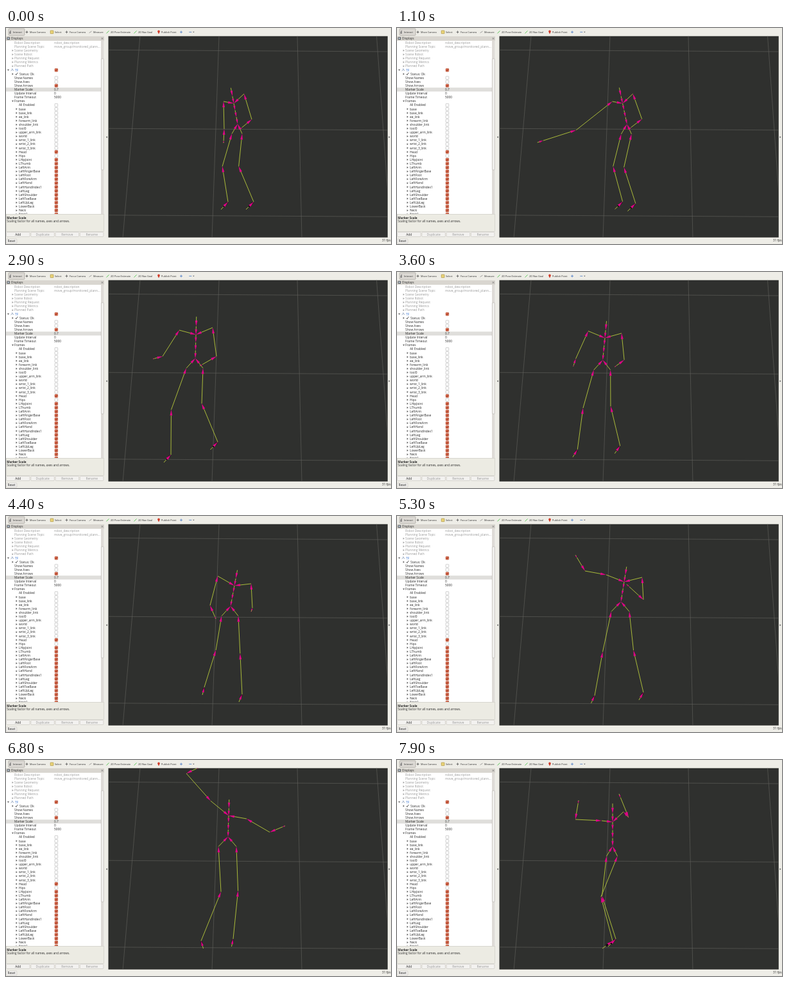
Recreate the animation shown at these times as an HTML page. Size 600 by 338 pixels, loop 8 s.

```html
<!DOCTYPE html>
<html lang="en">
<head>
<meta charset="utf-8">
<title>Skeleton viewer</title>
<style>
html, body { margin: 0; width: 100%; height: 100%; overflow: hidden; background: #edece8; }
svg { display: block; width: 100%; height: 100%; font: 4.8px "Open Sans", "Noto Sans", sans-serif; }
text { fill: #2b2b2b; }
.tool { font-size: 3.85px; }
.dim { fill: #999; }
.grid { fill: none; stroke: #63645f; stroke-width: .6; }
.shafts { fill: none; stroke: #a9b93a; stroke-width: 1; }
.heads { fill: #e00486; }
.feet { fill: none; stroke: #16060c; stroke-width: 2.4; }
</style>
</head>
<body>
<svg viewBox="0 0 600 338">
  <defs>
    <clipPath id="treeClip"><rect y="20" width="148" height="271"/></clipPath>
    <clipPath id="viewClip"><rect x="159.5" y="12.8" width="435.3" height="315"/></clipPath>
  </defs>
  <rect width="600" height="338" fill="#eeede7"/>
  <g id="toolbar"></g>
  <rect y="13" width="153" height="7" fill="#d9d6d0"/>
  <rect x="1.5" y="14.3" width="4.5" height="4" rx=".6" fill="#3c4044"/>
  <rect x="2.2" y="15" width="3.1" height="2.3" fill="#b8c4ce"/>
  <text x="8" y="18.3">Displays</text>
  <path d="M148.5 15l3 3m0-3l-3 3" stroke="#666" stroke-width=".6"/>
  <rect y="20" width="152.5" height="271" fill="#fff"/>
  <g id="tree" clip-path="url(#treeClip)"></g>
  <rect x="148" y="20" width="4.5" height="271" fill="#dedbd7"/>
  <rect x="148.4" y="48" width="3.8" height="174" rx="1" fill="#f2f1ef" stroke="#a8a49e" stroke-width=".5"/>
  <rect x=".3" y="291.3" width="152.3" height="27" fill="#ecebe3" stroke="#c4c1bb" stroke-width=".5"/>
  <text x="1.3" y="298.6" font-weight="700" font-size="4.7">Marker Scale</text>
  <text x="1.3" y="304.2" font-size="4.7">Scaling factor for all names, axes and arrows.</text>
  <g id="buttons"></g>
  <text x="599.5" y="334.4" text-anchor="end">31 fps</text>
  <path d="M157.8 169.2v3l-2-1.5zM596.5 169.2v3l2-1.5z" fill="#555"/>
  <g clip-path="url(#viewClip)">
    <rect x="159" y="12" width="436" height="317" fill="#2f302e"/>
    <path class="grid" d="M159 34.4L595 37M159 157.2L595 159.8M159 292.8L595 295.3
      M209 12L182 329M332 12L321 329M454 12L461 329M577.5 12L600 329"/>
    <path id="shafts" class="shafts"/>
    <path id="feet" class="feet"/>
    <path id="heads" class="heads"/>
  </g>
</svg>
<script>
const byId = id => document.getElementById(id);

function add(parent, tag, attrs, content = "") {
  const node = document.createElementNS("http://www.w3.org/2000/svg", tag);
  for (const name in attrs) node.setAttribute(name, attrs[name]);
  node.textContent = content;
  return parent.appendChild(node);
}

function buildToolbar() {
  const bar = byId("toolbar");
  add(bar, "rect", { x: 4, y: 1, width: 25, height: 10.6, rx: 1.3, fill: "#dcd9d4", stroke: "#98948d", "stroke-width": .6 });
  const tool = (label, x, icon, fill, stroke = "none") => {
    add(bar, "path", { d: icon, transform: `translate(${x - 4.5} 6.4)`, fill, stroke, "stroke-width": .8 });
    add(bar, "text", { x, y: 7.8, class: "tool" }, label);
  };
  const cross = "M-2 0h4M0 -2v4", arrow = "M-2 2l4 -4";
  tool("Interact", 11, "M-1 0l1 -2 1 -1.5v6h-2z", "#777");
  tool("Move Camera", 37, cross, "none", "#4a4a4a");
  tool("Select", 76, "M-2.3 -2.3h4.6v4.6h-4.6z", "#ecd67a", "#b39a42");
  tool("Focus Camera", 99, cross, "none", "#555");
  tool("Measure", 136, "M-2 1.2l4 -2.4", "none", "#888");
  tool("2D Pose Estimate", 163, arrow, "none", "#35c135");
  tool("2D Nav Goal", 206, arrow, "none", "#35c135");
  tool("Publish Point", 242, "M.5 3l-1.7 -3.5a1.8 1.8 0 1 1 3.4 0z", "#d23a28");
  tool("", 277.5, cross, "none", "#4676c4");
  tool("", 291.8, "M-2 0h4", "none", "#4676c4");
  tool("", 296.9, "M-1.2 -.6h2.4l-1.2 1.4z", "#555");
}

function buildTree() {
  const tree = byId("tree");
  const rows = [];
  const row = (names, x, options = {}) =>
    names.split(" ").forEach(name => rows.push({ name: name.replaceAll("~", " "), x, ...options }));
  row("Robot~Description", 13, { dim: true, value: "robot_description" });
  row("Planning~Scene~Topic", 13, { dim: true, value: "move_group/monitored_plann..." });
  row("Scene~Geometry Scene~Robot Planning~Request Planning~Metrics Planned~Path", 13, { dim: true, arrow: "right" });
  row("TF", 14, { arrow: "down", arrowX: 3.5, check: true, color: "#2f6fd0" });
  row("Status:~Ok", 21, { arrow: "right", tick: true });
  row("Show~Names Show~Axes", 13, { check: false });
  row("Show~Arrows", 13, { check: true });
  row("Marker~Scale", 13, { value: "0.7", selected: true });
  row("Update~Interval", 13, { value: "0" });
  row("Frame~Timeout", 13, { value: "5000" });
  row("Frames", 13, { arrow: "down" });
  row("All~Enabled", 20, { check: false });
  row("base base_link ee_link forearm_link shoulder_link tool0 upper_arm_link world wrist_1_link wrist_2_link wrist_3_link",
    20, { arrow: "right", check: false });
  row("Head", 20, { arrow: "right", check: true });
  row("Hips", 20, { arrow: "right", check: false });
  row("LHipJoint LThumb LeftArm LeftFingerBase LeftFoot LeftForeArm LeftHand LeftHandIndex1 LeftLeg LeftShoulder LeftToeBase LeftUpLeg LowerBack Neck Neck1",
    20, { arrow: "right", check: true });

  rows.forEach((r, i) => {
    const y = 23.1 + i * 6.1;
    if (r.selected) add(tree, "rect", { x: 0, y: y - 3, width: 148, height: 6.1, fill: "#dfdedb" });
    const label = add(tree, "text", { x: r.x, y: y + 1.7, class: r.dim ? "dim" : "" }, r.name);
    if (r.color) label.style.fill = r.color;
    if (r.value) add(tree, "text", { x: 75, y: y + 1.7, class: r.dim ? "dim" : "" }, r.value);
    if (r.arrow) {
      const x = r.arrowX || (r.x > 19 && !r.tick ? 16.5 : 10.5);
      const shape = r.arrow === "down" ? "m-1.5 -1h3l-1.5 2.2z" : "m-1 -1.5v3l2.2 -1.5z";
      add(tree, "path", { d: `M${x} ${y}${shape}`, fill: r.dim ? "#999" : "#555" });
    }
    if (r.tick) add(tree, "path", { d: `M14.5 ${y}l1.3 1.7 2.3-3.7`, fill: "none", stroke: "#333", "stroke-width": .8 });
    if (r.color) add(tree, "path", { d: `M7.7 ${y + 1.5}l2-2.3 2.4 1.7m-2.4-1.7v-1.7`, fill: "none", stroke: "#6b83a8", "stroke-width": .7 });
    if ("check" in r) {
      add(tree, "rect", { x: 76, y: y - 2.3, width: 4.7, height: 4.7, rx: .8,
        fill: r.check ? "#e0684a" : "#fff", stroke: r.check ? "#a9543c" : "#aaa", "stroke-width": .55 });
      if (r.check) add(tree, "path", { d: `M77 ${y}l1.1 1.2 1.9-2.8`, fill: "none", stroke: "#702a18", "stroke-width": .75 });
    }
  });
}

function buildButtons() {
  const group = byId("buttons");
  const button = (label, x, y, width, dim) => {
    add(group, "rect", { x, y, width, height: 7, rx: 1, fill: "#f3f2f0", stroke: "#bdb9b3", "stroke-width": .5 });
    add(group, "text", { x: x + width / 2, y: y + 5.2, "text-anchor": "middle", class: dim ? "dim" : "" }, label);
  };
  ["Add", "Duplicate", "Remove", "Rename"].forEach((label, i) => button(label, .5 + i * 38.3, 319.6, 36.5, i > 0));
  button("Reset", .4, 330, 16.4, false);
}

// width: half the shoulder span, tilt: shoulder slope, leg: ankle and knee bend,
// arm: elbow and fingertip, swing: how far a hand reaches out on the way to the next pose.
const poses = [
  { time: 500, neck: [355, 118], pelvis: [361, 150], width: 16, tilt: -6, swing: -115,
    legs: [[346, 272, -12], [386, 272, -14]], arms: [[340, 158, 339, 180], [383, 143, 365, 158]] },
  { time: 1900, neck: [347, 118], pelvis: [355, 151], width: 16, tilt: -6, swing: -80,
    legs: [[359, 271, -16], [353, 278, -16]], arms: [[329, 162, 320, 178], [380, 142, 357, 158]] },
  { time: 2900, neck: [296, 98], pelvis: [295, 135], width: 26, tilt: -2, swing: 0,
    legs: [[257, 286, -12], [330, 266, -13]], arms: [[244, 132, 229, 136], [328, 132, 302, 147]] },
  { time: 4400, neck: [356, 109], pelvis: [350, 141], width: 26, tilt: 6, swing: 0,
    legs: [[309, 268, 4], [368, 279, 0]], arms: [[318, 140, 327, 161], [384, 144, 382, 150]] },
  { time: 5300, neck: [354, 103], pelvis: [349, 134], width: 28, tilt: 2, swing: -32,
    legs: [[308, 281, -1], [384, 276, -4]], arms: [[293, 86, 278, 61], [384, 131, 358, 107]] },
  { time: 6800, neck: [347, 87], pelvis: [346, 120], width: 28, tilt: 14, swing: 90,
    legs: [[304, 283, 17], [354, 280, 5]], arms: [[281, 21, 300, 12], [411, 113, 435, 103]] },
  { time: 7900, neck: [336, 97], pelvis: [336, 135], width: 17, tilt: -7, swing: 0,
    legs: [[341, 280, -14], [336, 283, -22]], arms: [[278, 93, 283, 63], [361, 90, 346, 53]] },
];

function mix(a, b, u) {
  if (Array.isArray(a)) return a.map((value, i) => mix(value, b[i], u));
  if (typeof a === "object") return Object.fromEntries(Object.keys(a).map(key => [key, mix(a[key], b[key], u)]));
  return a + (b - a) * u;
}

function poseAt(time) {
  const next = Math.max(1, poses.findIndex(pose => pose.time >= time));
  const from = poses[next - 1], to = poses[next];
  const u = Math.max(0, (time - from.time) / (to.time - from.time));
  const pose = mix(from, to, u);
  const reach = from.swing * Math.sin(Math.PI * u);
  const arm = pose.arms[reach < 0 ? 0 : 1];
  arm[0] += reach / 2;
  arm[2] += reach;
  return pose;
}

function draw(time) {
  const { neck, pelvis, width, tilt, legs, arms } = poseAt(time);
  let shafts = "", heads = "", feet = "";

  // Arrows run from child to parent, with the cone at the parent.
  function bone(parent, child) {
    const dx = child[0] - parent[0], dy = child[1] - parent[1];
    const length = Math.hypot(dx, dy) || 1;
    const cone = Math.min(9, length * .65), half = Math.min(1.9, .8 + length * .07);
    const ux = dx / length, uy = dy / length;
    const bx = parent[0] + ux * cone, by = parent[1] + uy * cone;
    shafts += `M${child}L${[bx, by]}`;
    heads += `M${parent}L${[bx - uy * half, by + ux * half]}L${[bx + uy * half, by - ux * half]}z`;
  }
  function chain(...points) {
    for (let i = 1; i < points.length; i++) bone(points[i - 1], points[i]);
  }

  const spine = u => mix(pelvis, neck, u);
  chain(pelvis, spine(1 / 3), spine(2 / 3), neck, spine(1.35), spine(1.76));
  [-1, 1].forEach((side, i) => {
    const [ankleX, ankleY, bend] = legs[i];
    const hip = [pelvis[0] - 1 + side * width / 2, pelvis[1] + 15.5];
    const ankle = [ankleX, ankleY];
    const knee = mix(hip, ankle, .48);
    knee[0] += bend;
    // Feet point the way the knees bend.
    const toe = [ankleX - 5 + bend / 2, ankleY + 12];
    chain(pelvis, hip, knee, ankle, toe);
    feet += `M${mix(ankle, toe, .1)}L${mix(ankle, toe, .65)}`;

    const shoulder = [neck[0] + side * width, neck[1] - 9 + side * tilt];
    const elbow = arms[i].slice(0, 2), tip = arms[i].slice(2);
    chain(neck, shoulder, elbow, mix(elbow, tip, .85), tip);
  });
  byId("shafts").setAttribute("d", shafts);
  byId("heads").setAttribute("d", heads);
  byId("feet").setAttribute("d", feet);
}

buildToolbar();
buildTree();
buildButtons();

const start = performance.now();
function tick() {
  const elapsed = Math.max(0, performance.now() - start) % 8000;
  draw(Math.floor(elapsed / 100) * 100);
  requestAnimationFrame(tick);
}
tick();
</script>
</body>
</html>
```
